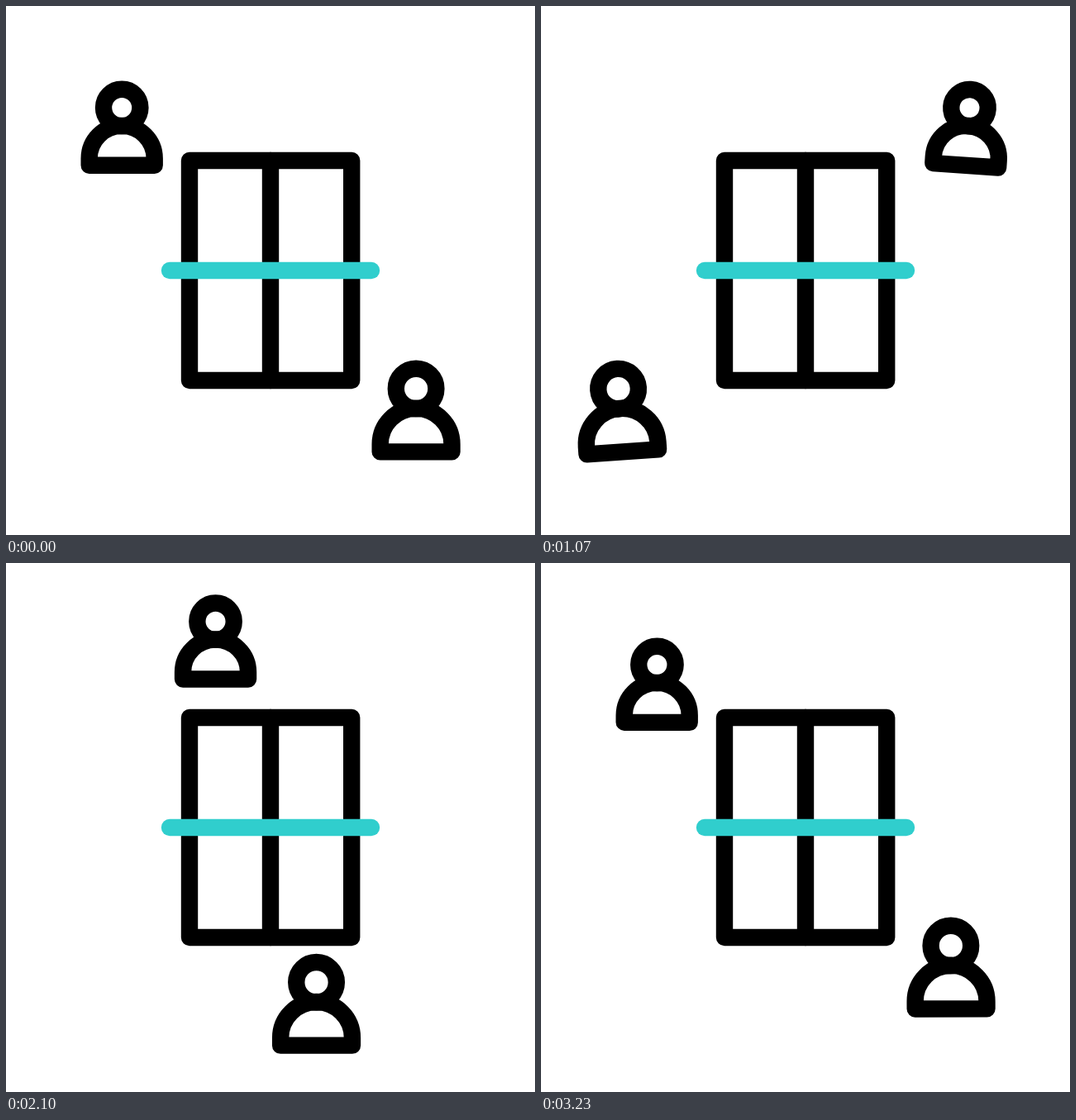
Write an HTML page with a canvas that moves like this. It is 640 by 640 pixels and loops after 3270 ms.

```html
<!DOCTYPE html>
<html lang="en">
<head>
<meta charset="utf-8">
<title>Table tennis</title>
<style>
html, body { margin: 0; width: 100%; height: 100%; overflow: hidden; background: #fff; }
canvas { display: block; width: 100vw; height: 100vh; }
</style>
</head>
<body>
<canvas id="stage" width="640" height="640"></canvas>
<script>
const ctx = document.getElementById('stage').getContext('2d');
const LOOP = 3270;
const LINE = 20.4;

// headY is the resting head centre; lift is the height of the arc (down is positive)
const players = [
  { from: 140.2, to: 513.7, headY: 123, head: 22.2, lift: -61.5, arcY: 61.4, half: 39.5, base: 69.8, side: 1 },
  { from: 496.1, to: 98.8, headY: 463, head: 24.3, lift: 52, arcY: 67.2, half: 43.4, base: 76.4, side: -1 }
];

// peak: top of the arc; a, b: pacing across; tilt: [time, degrees] after landing
const trips = [
  { start: 0, peak: 367, land: 767, a: 0.095, b: 0.961, tilt: [[0, 0], [200, 8.5], [467, -5.3], [833, 0]] },
  { start: 1600, peak: 393, land: 833, a: 0.1, b: 1.045, tilt: [[0, 0], [167, 10.5], [433, -6.5], [837, 0]] }
];

const clamp = v => Math.min(1, Math.max(0, v));
const smooth = v => { const u = clamp(v); return u * u * (3 - 2 * u); };

function pace(u, a, b) {
  const v = 1 - u;
  return 3 * v * v * u * a + 3 * v * u * u * b + u * u * u;
}

function keyed(keys, t) {
  for (let i = 1; i < keys.length; i++) {
    const [t0, v0] = keys[i - 1], [t1, v1] = keys[i];
    if (t < t1) return v0 + (v1 - v0) * smooth((t - t0) / (t1 - t0));
  }
  return keys[keys.length - 1][1];
}

function pose(time) {
  const back = time >= trips[1].start;
  const trip = trips[back ? 1 : 0];
  const t = time - trip.start;
  const along = pace(clamp(t / trip.land), trip.a, trip.b);
  const lift = t < trip.peak
    ? smooth(t / trip.peak)
    : smooth((trip.land - t) / (trip.land - trip.peak));
  const tilt = t > trip.land ? keyed(trip.tilt, t - trip.land) : 0;
  return { across: back ? 1 - along : along, lift, tilt: back ? -tilt : tilt };
}

function drawPlayer(p, { across, lift, tilt }) {
  ctx.save();
  ctx.translate(p.from + (p.to - p.from) * across, p.headY + p.lift * lift + p.base);
  ctx.rotate(tilt * p.side * Math.PI / 180);
  ctx.translate(0, -p.base);
  ctx.beginPath();
  ctx.arc(0, 0, p.head, 0, Math.PI * 2);
  ctx.stroke();
  ctx.beginPath();
  ctx.moveTo(-p.half, p.base);
  ctx.arc(0, p.arcY, p.half, Math.PI, 0);
  ctx.lineTo(p.half, p.base);
  ctx.closePath();
  ctx.stroke();
  ctx.restore();
}

function line(x0, y0, x1, y1) {
  ctx.beginPath();
  ctx.moveTo(x0, y0);
  ctx.lineTo(x1, y1);
  ctx.stroke();
}

function drawTable() {
  ctx.strokeRect(222, 187, 196.2, 266);
  line(320, 187, 320, 453);
  ctx.strokeStyle = '#30cecd';
  line(198, 320, 442, 320);
}

function draw(now) {
  ctx.fillStyle = '#fff';
  ctx.fillRect(0, 0, 640, 640);
  ctx.lineWidth = LINE;
  ctx.lineCap = ctx.lineJoin = 'round';
  ctx.strokeStyle = '#000';
  const state = pose(now % LOOP);
  players.forEach(p => drawPlayer(p, state));
  drawTable();
}

let first = null;
function tick(now) {
  if (first === null) first = now;
  draw(now - first);
  requestAnimationFrame(tick);
}
draw(0);
requestAnimationFrame(tick);
</script>
</body>
</html>
```
